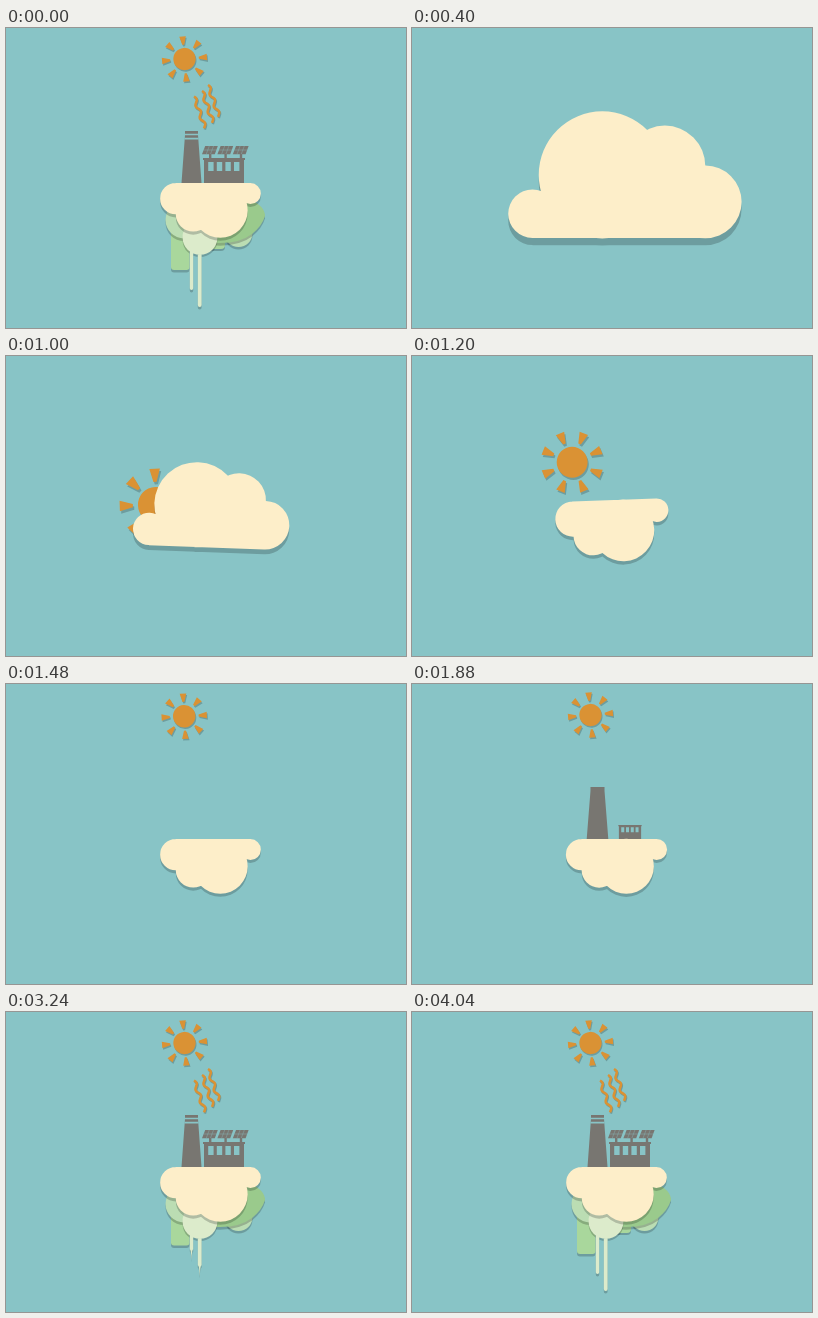
An HTML page that plays this animation: 400 by 300 pixels, repeating every 5.04 s.

```html
<!DOCTYPE html>
<html lang="en">
<head>
<meta charset="utf-8">
<title>Green energy island</title>
<style>
  html, body { margin: 0; width: 100%; height: 100%; overflow: hidden; background: #88c4c6; }
  svg { display: block; width: 100vw; height: 100vh; }
</style>
</head>
<body>
<svg id="stage" viewBox="0 0 400 300"></svg>
<script>
const LOOP = 5040, STEP = 40;
const SKY = '#88c4c6', CREAM = '#fdeec9', ORANGE = '#da9234', GRAY = '#787671';
const PALE = '#dcebcb', MINT = '#bbddb3', LEAF = '#a9d79c', MOSS = '#9aca8c';
const stage = document.getElementById('stage');

// Easing
const lerp = (a, b, p) => a + (b - a) * p;
const clamp = v => Math.max(0, Math.min(1, v));
const outQuad = u => 1 - (1 - u) ** 2;
const inOut = (u, k) => u < .5 ? (2 * u) ** k / 2 : 1 - (2 - 2 * u) ** k / 2;
const sine = u => (1 - Math.cos(Math.PI * u)) / 2;
const back = (u, s = 1.7) => u <= 0 ? 0 : 1 + (s + 1) * (u - 1) ** 3 + s * (u - 1) ** 2;

// Path pieces, all clockwise so that overlaps merge
const circ = (x, y, r) => `M${x - r} ${y}a${r} ${r} 0 1 1 ${2 * r} 0a${r} ${r} 0 1 1 ${-2 * r} 0z`;
const rect = (x, y, w, h) => `M${x} ${y}h${w}v${h}h${-w}z`;

const shape = (d, fill, tf = '', more = '') =>
  `<path d="${d}" fill="${fill}" transform="${tf}" ${more}/>`;
const raised = (d, fill, dx, dy, tf = '') =>
  shape(d, '#000', `translate(${dx} ${dy}) ${tf}`, 'opacity=".2"') + shape(d, fill, tf);
const place = (x, y, s, a = 0) => `translate(${x} ${y}) rotate(${a}) scale(${s})`;
const about = (x, y, sx, sy = sx) => `translate(${x} ${y}) scale(${sx} ${sy}) translate(${-x} ${-y})`;

// Cloud centred on its own bounding box
const CLOUD = circ(-96, 40.5, 25.2) + circ(-23.5, .2, 66) + circ(41.5, -9, 42) +
  circ(83.5, 28.2, 37.7) + rect(-96, 40.5, 180, 25.3) + rect(-23.5, -6, 107, 71.8);

const RAYS = Array.from({ length: 8 }, (_, i) => {
  const a = i * Math.PI / 4, c = Math.cos(a), s = Math.sin(a);
  const at = (r, w) => `${(r * c - w * s).toFixed(2)} ${(r * s + w * c).toFixed(2)}`;
  return `M${at(20, -1.4)}L${at(31.5, -4.6)}L${at(31.5, 4.6)}L${at(20, 1.4)}Z`;
}).join('');
const SUN = circ(0, 0, 15.6) + RAYS;

const CHIMNEY = 'M179 103H192V107L195.5 155H175.5L179 107Z';
const HOUSE = rect(198, 130, 40, 25) + rect(197, 130, 42, 2);

function sun(T) {
  if (T < 520) return '';
  const u = clamp((T - 1000) / 560), p = inOut(u, 2);
  const s = lerp(1.15, .715, p);
  const tf = place(lerp(149.5, 178.5, p), lerp(150, 31, p), s, -185 * p);
  return raised(SUN, ORANGE, 1.2 * s, 2.2 * s, tf);
}

function cloud(T) {
  const grow = clamp((T - 320) / 200), fall = clamp((T - 520) / 200);
  let s = 1.19 * Math.sin(grow * Math.PI / 2) - .54 * sine(fall);
  let x = 213.5 + 15.8 * (s - 1), y = 146.5 - 5 * (s - 1), a = 0;
  if (T > 1000) {
    const u = clamp((T - 1000) / 360), p = inOut(u, 2);
    s = lerp(s, .4156, p);
    x = lerp(x, 204.5, p) - 5.6 * Math.sin(Math.PI * u);
    y = lerp(y, 182.4, p);
    a = 180 * inOut(clamp((T - 1000) / 280), 3);
    s *= 1 + .015 * Math.sin(Math.PI * clamp((T - 1560) / 400));
  }
  return raised(CLOUD, CREAM, 0, 7.4 * s, place(x, y, s, a));
}

function panel(i, T) {
  const x = 196 + 15.4 * i, s = back(clamp((T - 2120 - 60 * i) / 360));
  if (!s) return '';
  const frame = `M${x + 3.2} 118h12.6l-3 8.2h-12.8z`;
  const grid = `M${x + 1.5} 122h13M${x + 7.3} 118l-3 8M${x + 11.5} 118l-3 8`;
  return `<g transform="${about(x + 8, 130, s)}">` + shape(frame, GRAY) +
    shape(rect(x + 7, 126, 2.4, 4.5), GRAY) +
    shape(grid, 'none', '', `stroke="${SKY}" stroke-width=".6" opacity=".6"`) + '</g>';
}

function plant(T) {
  if (T <= 1560) return '';
  const tall = back(clamp((T - 1560) / 320)), wide = back(clamp((T - 1640) / 400));
  const size = outQuad(clamp((T - 1840) / 240));
  const cut = 14 * outQuad(clamp((T - 2120) / 280));
  let out = shape(CHIMNEY, GRAY, about(185.5, 155, wide, tall));
  if (cut) out += shape(rect(185.5 - cut / 2, 105.8, cut, 1.5) + rect(185.5 - cut / 2, 109.8, cut, 1.8), SKY);
  if (size) {
    let panes = '';
    for (let i = 0; i < 4; i++) panes += rect(202.2 + 8.6 * i, 134, 5.4, 9);
    const tf = about(218, 155, size);
    out += shape(HOUSE, GRAY, tf) + shape(panes, SKY, tf);
  }
  for (let i = 0; i < 3; i++) out += panel(i, T);
  return out;
}

function heat(T) {
  const end = .6 * clamp((T - 2320) / 360) + .4 * clamp((T - 2680) / 560);
  if (!end) return '';
  let out = '';
  for (const [x, y] of [[188, 68.5], [196, 63], [202, 57]]) {
    const pts = [];
    for (let i = 0; i <= 30; i++) {
      const u = end * i / 30, w = 1.7 * Math.sin(u * 2 * Math.PI * 2.6);
      pts.push(`${(x + 11 * u + w * .95).toFixed(2)} ${(y + 31.5 * u - w * .33).toFixed(2)}`);
    }
    const line = (c, tf, o) => shape('M' + pts.join('L'), 'none', tf,
      `stroke="${c}" stroke-width="2.5" stroke-linejoin="round" opacity="${o}"`);
    out += line('#000', 'translate(.8 1.2)', .2) + line(ORANGE, '', 1);
  }
  return out;
}

// A drip whose tip goes from a spike (round 0) to a rounded end (round 1)
function drip(x, w, tip, round) {
  const b = tip - lerp(11, w / 2, round), k = .1 + .4 * round, m = x + w / 2;
  const cy = lerp(b, tip, round);
  return `M${x} 200H${x + w}V${b}Q${m + w * k} ${cy} ${m} ${tip}Q${m - w * k} ${cy} ${x} ${b}Z`;
}

function roots(T) {
  if (T <= 2160) return '';
  const a = clamp((T - 2160) / 480), b = clamp((T - 2680) / 560), c = clamp((T - 3240) / 560);
  const pa = back(a, 2.2), pb = inOut(b, 2), pc = outQuad(c);
  let out = '';
  if (b) {
    const foot = 205 + 27 * outQuad(b) + 10 * pc;
    out += raised(`M165 190H183.5V${foot - 3}q0 3-3 3H168q-3 0-3-3Z`, LEAF, 0, 2.6);
  }
  if (c) {
    const foot = 205 + 16 * pc;
    out += raised(`M198 195H219V${foot - 4}q0 4-4 4H198Z`, LEAF, 0, 2);
  }
  const side = back(clamp((T - 2720) / 440), 2.6);
  if (side) {
    out += raised(circ(232.5, 205, 14), MINT, 0, 2.6, about(218, 190, side));
    out += raised('M200 178L243 171Q259 178 259 188Q256 198 246 206Q233 216 210 215Z',
      MOSS, 0, 2.6, about(214, 186, side));
  }
  out += raised(circ(lerp(lerp(184, 174, pa), 178, pb), lerp(lerp(182, 194, pa), 192, pb),
    Math.max(0, lerp(19 * pa, 18.5, pb))), MINT, 0, 2.6);
  const lobe = circ(lerp(193, 194, pb), lerp(lerp(182, 203.5, pa), 209.3, pb),
    Math.max(0, lerp(22 * pa, 17.5, pb)));
  const left = 212 + 13 * a + 21 * b + 16 * pc, right = 212 + 16 * a + 34 * b + 17 * pc;
  const round = clamp((T - 3360) / 640);
  out += raised(lobe + drip(183.8, 3.4, left, round) + drip(191.8, 3.8, right, round), PALE, 0, 2.4);
  return out;
}

let shown = -1;
function draw(t) {
  const n = Math.floor(t / STEP);
  if (n === shown) return;
  shown = n;
  const T = n ? (n + 1) * STEP : LOOP;
  stage.innerHTML = shape(rect(0, 0, 400, 300), SKY) +
    (T <= 320 ? '' : sun(T) + heat(T) + plant(T) + roots(T) + cloud(T));
}

const start = performance.now();
function tick() {
  draw((performance.now() - start) % LOOP);
  requestAnimationFrame(tick);
}
tick();
</script>
</body>
</html>
```
